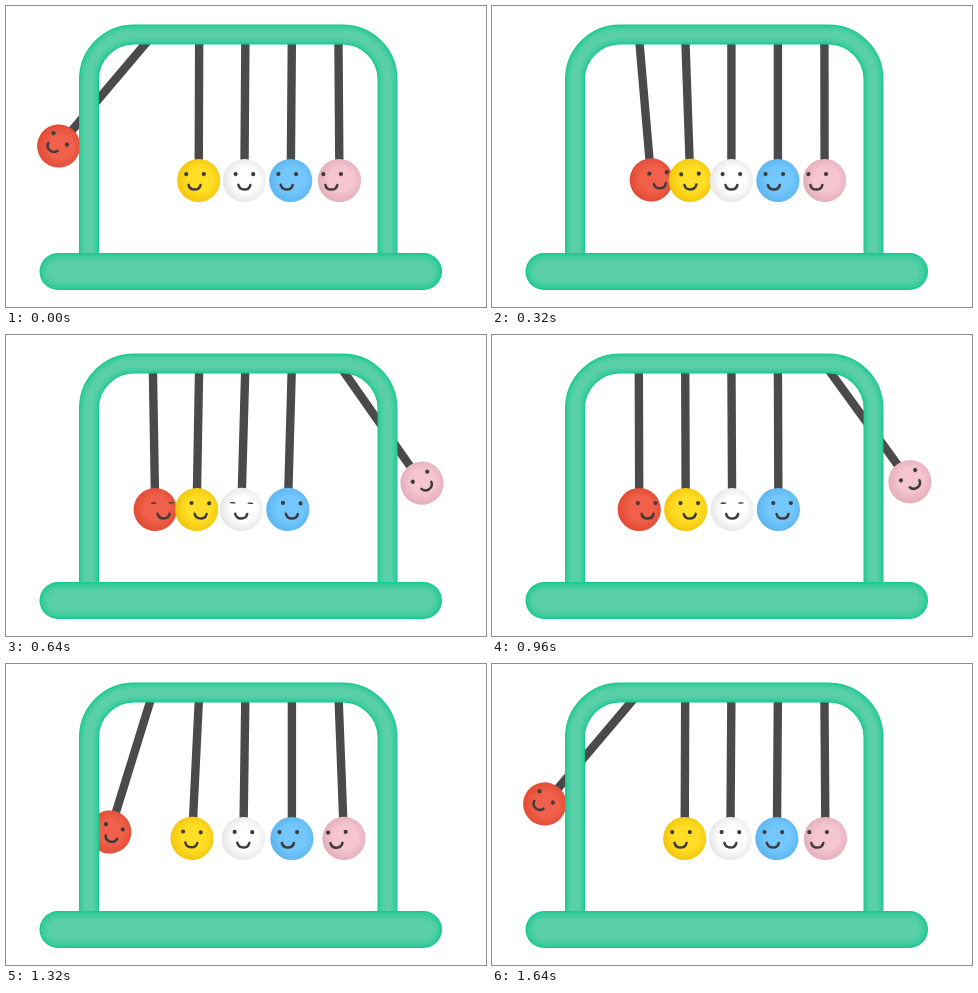
Recreate the animation shown at these times as an HTML page. Size 480 by 301 pixels, loop 1680 ms.

```html
<!DOCTYPE html>
<html lang="en">
<head>
<meta charset="utf-8">
<title>Cradle</title>
<style>
html, body { margin: 0; width: 100%; height: 100%; overflow: hidden; background: #fff; }
svg { display: block; width: 100vw; height: 100vh; }
</style>
</head>
<body>
<svg id="stage" viewBox="0 0 480 301">
  <defs id="defs"></defs>
  <g id="balls"></g>
  <g id="frame" fill="none"></g>
</svg>
<script>
const LOOP = 1680, HALF = LOOP / 2, STEP = 40;
const PIVOT_Y = 29, LENGTH = 145.5, RADIUS = 21.6, PEAK = 40.3;
const INK = '#403b3b';

const byId = id => document.getElementById(id);
const mod = t => ((t % LOOP) + LOOP) % LOOP;
const clamp = v => Math.max(0, Math.min(1, v));
const smooth = (a, b, t) => {
  const u = clamp((t - a) / (b - a));
  return u * u * (3 - 2 * u);
};

function add(parent, tag, attrs) {
  const el = document.createElementNS('http://www.w3.org/2000/svg', tag);
  for (const k in attrs) el.setAttribute(k, attrs[k]);
  parent.appendChild(el);
  return el;
}

// Looping Catmull-Rom curve through [time, value] points
function curve(points) {
  const n = points.length;
  const at = i => {
    const [t, v] = points[(i + n) % n];
    return [t + Math.floor(i / n) * LOOP, v];
  };
  return time => {
    const t = mod(time);
    let i = 0;
    while (i < n - 1 && at(i + 1)[0] <= t) i++;
    const [a, b, c, d] = [at(i - 1), at(i), at(i + 1), at(i + 2)];
    const h = c[0] - b[0], u = (t - b[0]) / h;
    const m1 = (c[1] - a[1]) / (c[0] - a[0]) * h;
    const m2 = (d[1] - b[1]) / (d[0] - b[0]) * h;
    const u2 = u * u, u3 = u2 * u;
    return (2 * u3 - 3 * u2 + 1) * b[1] + (u3 - 2 * u2 + u) * m1 +
           (3 * u2 - 2 * u3) * c[1] + (u3 - u2) * m2;
  };
}

// Left end ball: drop, damped ringing after the hit, then the next rise
function swing(time) {
  const p = mod(time + 40);
  const drop = 290, lift = 1265;
  if (p < drop) return -PEAK * (1 - Math.pow(p / drop, 3.76));
  if (p < lift) {
    const s = (p - drop) / 1000;
    return 7.1 * Math.sin(6 * Math.PI * s) * Math.exp(-4.8 * s);
  }
  return -PEAK * (1 - Math.pow((LOOP - p) / (LOOP - lift), 2.14));
}

const inner = curve([[0, -.2], [120, -.2], [240, 0], [320, 2], [480, 0], [640, -1], [800, .4],
  [960, .2], [1160, 0], [1220, 0], [1320, -2.8], [1480, 1.6], [1640, -.2]]);
const middle = curve([[0, -.4], [120, -.3], [320, 0], [480, .8], [640, -1.6], [800, .4],
  [960, .3], [1160, 0], [1320, -.8], [1480, 1.6], [1640, -.4]]);

const endLook = t => 7.4 + 10.9 * Math.min(0, swing(t)) / PEAK;
const innerLook = t => -3.7 + 7.3 * (smooth(210, 430, t) - smooth(1190, 1430, t));
const mirror = fn => t => -fn(mod(t - HALF));
const shut = (a, b) => t => smooth(a, a + 80, t) - smooth(b - 80, b, t);
const zero = () => 0;

const balls = [
  { x: 146.8, mid: '#f0604a', rim: '#e04a34', angle: swing, look: endLook, blink: shut(540, 740) },
  { x: 193.2, mid: '#ffde25', rim: '#f2c50c', angle: inner, look: innerLook, blink: zero },
  { x: 239.4, mid: '#ffffff', rim: '#e5e5e6', angle: middle, look: zero, blink: shut(540, 1060) },
  { x: 285.9, mid: '#73c7fc', rim: '#5cb5ef', angle: mirror(inner), look: mirror(innerLook), blink: zero },
  { x: 332.4, mid: '#f5c5d0', rim: '#e2adba', angle: mirror(swing), look: mirror(endLook), blink: zero }
];

balls.forEach((b, i) => {
  const grad = add(byId('defs'), 'radialGradient', { id: 'g' + i, cx: .54, cy: .48, r: .55 });
  add(grad, 'stop', { offset: .5, 'stop-color': b.mid });
  add(grad, 'stop', { offset: 1, 'stop-color': b.rim });
  b.g = add(byId('balls'), 'g', {});
  add(b.g, 'line', { y2: LENGTH, stroke: '#4a4a4b', 'stroke-width': 8.4 });
  add(b.g, 'circle', { cy: LENGTH, r: RADIUS, fill: `url(#g${i})` });
  b.eyes = [-8.8, 8.8].map(x => ({ x, el: add(b.g, 'ellipse', { fill: INK }) }));
  b.smile = add(b.g, 'path', {
    d: 'M-6 4.4C-4.6 10.6 4.6 10.6 6 4.4', fill: 'none', stroke: INK,
    'stroke-width': 2.5, 'stroke-linecap': 'round'
  });
});

// Green stand: stacked strokes fade from a vivid rim to a soft core
const mix = u => `rgb(${[[22, 90], [201, 207], [143, 168]].map(([a, b]) => Math.round(a + (b - a) * u))})`;
const LAYERS = 8;
function layers(draw) {
  for (let i = 0; i < LAYERS; i++) draw(i, mix(Math.sqrt(i / (LAYERS - 1))));
}
layers((i, stroke) => add(byId('frame'), 'path', {
  d: 'M83 256V73.5A45 45 0 0 1 128 28.5H336.5A45 45 0 0 1 381.5 73.5V256',
  stroke, 'stroke-width': 20 - i * 1.9
}));
layers((i, stroke) => add(byId('frame'), 'path', {
  d: 'M52 265.5H417.5', stroke, 'stroke-width': 37 - i * 2.6, 'stroke-linecap': 'round'
}));

function render(time) {
  const t = Math.floor(mod(time) / STEP) * STEP;
  for (const b of balls) {
    const look = b.look(t), blink = b.blink(t);
    b.g.setAttribute('transform', `translate(${b.x} ${PIVOT_Y}) rotate(${-b.angle(t)})`);
    for (const { x, el } of b.eyes) {
      el.setAttribute('cx', x + look);
      el.setAttribute('cy', LENGTH - 6.4);
      el.setAttribute('rx', 2.1 + .9 * blink);
      el.setAttribute('ry', 2.1 - 1.3 * blink);
    }
    b.smile.setAttribute('transform', `translate(${look * 1.12} ${LENGTH})`);
  }
}

const start = performance.now();
function tick() {
  render(performance.now() - start);
  requestAnimationFrame(tick);
}
tick();
</script>
</body>
</html>
```
